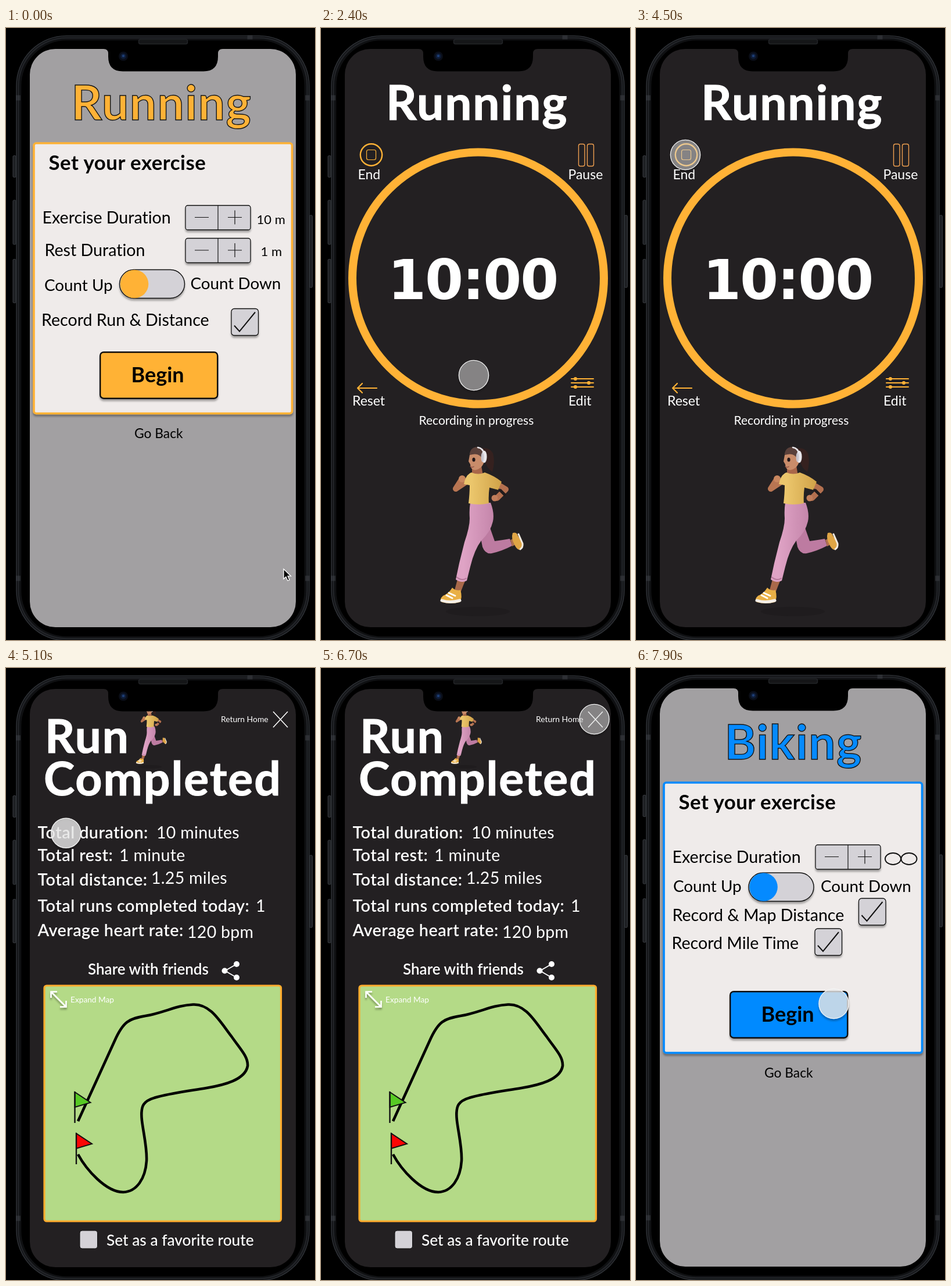
These frames come from a looping animation (532x1052 px, 8000 ms). An HTML page:

```html
<!DOCTYPE html>
<html lang="en">
<head>
<meta charset="utf-8">
<title>Workout prototype</title>
<style>
  html, body { margin: 0; width: 100%; height: 100%; overflow: hidden; background: #000; }
  svg { display: block; width: 532px; height: 1052px; }
  text { font-family: Lato, "Noto Sans", sans-serif; white-space: pre; font-variant-ligatures: none; }
  .clock { font-family: "DejaVu Sans", sans-serif; letter-spacing: -2px; }
</style>
</head>
<body>
<svg id="stage" viewBox="0 0 532 1052"></svg>
<script>
const ORANGE = '#ffb236', BLUE = '#058aff', DARK = '#232022', GREY = '#d4d2d7';

const text = (x, y, size, str, fill = '#000', weight = 400, extra = '') =>
  `<text x="${x}" y="${y}" font-size="${size}" font-weight="${weight}" fill="${fill}" ${extra}>${str}</text>`;
const rect = (x, y, w, h, r, fill, stroke = 'none', sw = 1, extra = '') =>
  `<rect x="${x}" y="${y}" width="${w}" height="${h}" rx="${r}" fill="${fill}" stroke="${stroke}" stroke-width="${sw}" ${extra}/>`;
const circle = (x, y, r, fill, stroke = 'none', sw = 1) =>
  `<circle cx="${x}" cy="${y}" r="${r}" fill="${fill}" stroke="${stroke}" stroke-width="${sw}"/>`;
const ellipse = (x, y, rx, ry, fill) => `<ellipse cx="${x}" cy="${y}" rx="${rx}" ry="${ry}" fill="${fill}"/>`;
const line = (d, stroke, sw, extra = '') =>
  `<path d="${d}" fill="none" stroke="${stroke}" stroke-width="${sw}" ${extra}/>`;
const shape = (d, fill, extra = '') => `<path d="${d}" fill="${fill}" ${extra}/>`;
const spacing = n => `letter-spacing="${n}"`;
const heading = (x, y, size, str) =>
  text(x, y, size, str, '#fff', 700, `stroke="#fff" stroke-width="1.2" ${spacing(1.9)}`);
const round = 'stroke-linecap="round" stroke-linejoin="round"';
const shadow = 'filter="url(#drop)"';

// Controls of the setup screens
const label = (x, y, str, size = 28.6) => text(x, y, size, str);
const stepper = y => rect(309, y, 112, 42, 4, GREY, '#111', 1.3, shadow) +
  line(`M365 ${y}v42M325 ${y + 20.5}h24M382 ${y + 20.5}h24M394 ${y + 8.5}v24`, '#111', 1.2);
const toggle = (x, y, color) => rect(x, y, 112, 49, 24.5, GREY, '#111', 1.4, shadow) +
  circle(x + 25.5, y + 24.5, 24.3, color);
const checkbox = (x, y) => rect(x, y, 46.5, 46, 5, GREY, '#111', 1.3, shadow) +
  line(`M${x + 5} ${y + 29}l9 10L${x + 41} ${y + 6}`, '#111', 2);

const setup = (name, x, color, rows) =>
  rect(41, 36, 458, 994, 44, '#a2a0a2') +
  text(x, 157.5, 82, name, color, 700, `stroke="#151515" stroke-width="1.4" ${spacing(1.5)}`) +
  rect(48, 198, 444.5, 464.5, 4, '#efebea', color, 3.6, shadow) +
  text(73.5, 244, 34.8, 'Set your exercise', '#000', 700, spacing(.5)) +
  label(62.5, 336, 'Exercise Duration') + stepper(305) + rows +
  rect(162.2, 557.2, 202, 79.5, 6, color, '#111', 2.4, shadow) +
  text(215.5, 609, 36, 'Begin', '#000', 700) +
  text(221, 705, 22.8, 'Go Back');

const runner =
  ellipse(270, 1003, 55, 8, '#1f1c1e') +
  // back leg and shoe
  shape('M270 850Q289 846 292 862L299 882Q314 880 325 878L329 890Q312 899 294 903Q283 905 278 892Z', '#bd7ba1') +
  shape('M326 880L333 877 335 888 329 891Z', '#b0714f') +
  shape('M330 868Q337 866 339 873L347 884Q348 896 341 897Q336 895 333 888Q327 877 330 868Z', '#dfa545') +
  line('M340 870L347 886Q348 893 343 896', '#f3ece2', 3, round) +
  // front leg and shoe
  shape('M236 944L250 946 245 958 240 971 229 970Z', '#a9694a') +
  shape('M257 816L292 816Q299 834 296 848Q292 866 276 881Q264 897 257 926L251 950Q242 955 232 948L238 920 247 884Q256 858 256 843Q255 828 257 816Z', 'url(#pants)') +
  line('M234 944Q242 951 250 946', '#b5779a', 2, round) +
  shape('M226 962Q232 968 240 966Q244 979 239 987Q224 991 208 987Q203 982 210 976Q220 972 226 962Z', '#e9b046') +
  line('M208 984Q222 989 239 984', '#f5efe7', 5, round) +
  line('M220 971L231 976M216 975L226 980', '#fff', 3, round) +
  // arms
  line('M303 784L318 793 303 808', '#b3704f', 10, round) +
  line('M309 795L316 802', '#201b1c', 5, round) +
  circle(299, 808, 5.5, '#c07d5b') +
  line('M253 778L232 792 241 778', '#b87552', 10, round) +
  circle(243, 775, 6, '#c9875f') +
  // shirt
  shape('M260 748L276 752 279 770 260 770Z', '#a9674a') +
  shape('M259 764Q271 769 282 764Q299 770 311 780L305 794 290 790Q288 804 289 817Q271 821 254 817Q256 800 256 786L246 784Q249 768 259 764Z', 'url(#shirt)') +
  // head
  shape('M276 723Q290 720 296 731Q300 746 295 763Q285 757 282 742Z', '#35211f') +
  shape('M256 734Q257 723 269 722Q282 724 282 741Q279 758 265 760Q257 759 257 750L254 745Z', '#c98c6a') +
  shape('M256 734Q256 721 269 720Q283 721 285 738Q281 746 277 740Q272 729 256 734Z', '#5a403a') +
  ellipse(263, 742, 2.6, 3.5, '#211719') +
  line('M257 754Q260 756 263 754', '#8c4d42', 1.5, round) +
  line('M270 721Q279 722 281 733', '#e8e6ea', 2.5, round) +
  ellipse(281, 737, 4.6, 10.5, '#e9e7eb') + ellipse(278, 738, 2.4, 8, '#c8c5ce');

const caption = (x, y, str) => text(x, y, 23, str, '#fff');
const sliders = [[603, 438], [610, 461], [617, 438]].map(([y, x]) =>
  line(`M431 ${y}h38`, ORANGE, 2, round) + circle(x, y, 3, ORANGE)).join('');

const timer =
  rect(41, 36, 458, 994, 44, DARK) +
  heading(112, 157.5, 82, 'Running') +
  circle(270.5, 430, 216.5, 'none', ORANGE, 14) +
  text(115, 466, 95, '10:00', '#fff', 700, 'class="clock"') +
  circle(86.5, 218, 18.7, 'none', ORANGE, 2.4) + rect(78.5, 209.5, 16, 17, 3, 'none', ORANGE, 1.2) +
  rect(443.5, 199.5, 10.5, 38, 3, 'none', '#f0a050', 1.4) + rect(458.5, 199.5, 11, 38, 3, 'none', '#f0a050', 1.4) +
  line('M96 619H63M71 611L63 619 71 627', ORANGE, 2.2, round) + sliders +
  caption(63.5, 260, 'End') + caption(425.5, 260, 'Pause') + caption(54, 649, 'Reset') + caption(426, 649, 'Edit') +
  text(168.5, 682, 21, 'Recording in progress', '#fff') + runner;

const stat = (y, name, x, value, dy = 0) =>
  text(54.5, y, 28.8, name, '#fff', 600, spacing(.45)) +
  text(x, y + dy, 28.5, value, '#fff', 400, spacing(.3));
const flag = (x, y, fill) =>
  shape(`M${x} ${y + 1}l27 18l-27 8z`, fill, 'stroke="#111" stroke-width="2"') + line(`M${x} ${y}v54`, '#111', 2.4);

const summary =
  rect(41, 36, 458, 994, 44, DARK) +
  `<g transform="translate(147.8 -201.3) scale(.37)">${runner}</g>` +
  heading(67, 146, 80, 'Run') +
  heading(65, 219, 80.5, 'Completed') +
  text(370, 93, 13.9, 'Return Home', '#fff') + line('M460 75L485 102M485 75L460 102', '#fff', 1.6) +
  stat(293, 'Total duration:', 259, '10 minutes') +
  stat(332, 'Total rest:', 195, '1 minute') +
  stat(374, 'Total distance:', 250, '1.25 miles', -3) +
  stat(419, 'Total runs completed today:', 430, '1') +
  stat(461, 'Average heart rate:', 312, '120 bpm', 3) +
  text(141, 527, 26, 'Share with friends', '#fff', 600) +
  line('M397 509L377 520.5 397 532', '#fff', 1.8) +
  circle(376.5, 520.5, 5, '#fff') + circle(397, 509, 5, '#fff') + circle(397, 532, 5, '#fff') +
  rect(66, 546, 407.5, 405, 4, '#b4da87', '#ffac2e', 3.2) +
  line('M78 557L103 582M77.5 567V556.5H88M103.5 572V582.5H93', '#fff', 2.6, shadow) +
  text(111, 575, 13.7, 'Expand Map', '#fff') +
  line('M124 779L187 641C202 607 212 603 240 598C275 592 292 580 322 578.5C352 577 368 607 388 633' +
    'C404 656 417 668 416 684C412 708 375 717 345 722C315 727 290 730 262 737C236 743 231 752 234 778' +
    'C237 802 243 825 242 847C240 878 225 900 202 901C172 901 138 862 124 836', '#000', 4.6) +
  flag(118.5, 728, '#57c924') + flag(121, 799, '#fb0505') +
  rect(127, 967, 30.5, 31, 4, GREY, '#111', 1) +
  text(173, 993, 26.3, 'Set as a favorite route', '#fff', 500);

const running = setup('Running', 112.5, ORANGE,
  text(431.5, 337, 22, '10 m') + label(66.5, 392, 'Rest Duration') + stepper(361.5) + text(438.5, 392, 22, '1 m') +
  label(66, 452, 'Count Up', 27.8) + toggle(195.5, 415.5, ORANGE) + label(317.5, 448.5, 'Count Down', 27.8) +
  label(61, 512, 'Record Run &amp; Distance') + checkbox(388, 482.5));

const biking = setup('Biking', 152.5, BLUE,
  '<g fill="none" stroke="#111" stroke-width="2"><ellipse cx="442.5" cy="329" rx="13.5" ry="10"/><ellipse cx="470" cy="329" rx="13.5" ry="10"/></g>' +
  label(64, 386, 'Count Up', 27.8) + toggle(194, 353, BLUE) + label(318, 386, 'Count Down', 27.8) +
  label(62.5, 436, 'Record &amp; Map Distance') + checkbox(383.5, 397) +
  label(61.5, 484, 'Record Mile Time') + checkbox(308, 449));

// Device: body behind the screens, notch in front of them
const button = (x, y, h) => rect(x, y, 5, h, 1.5, '#1d1f22', '#3b3e43', 1);
const body =
  button(12, 219.5, 37) + button(12, 296, 76) + button(12, 397.5, 75) + button(522.5, 322, 124) +
  rect(18, 13.5, 504, 1039.5, 86, '#0e0f11', '#2e3136', 1.6) +
  rect(21.5, 17, 497, 1032.5, 82, 'none', '#212327', 2.6) +
  rect(25.5, 20.5, 489, 1026, 79, '#000', '#111214', 1.5) +
  line('M17 120h8M515 120h8M17 946h8M515 946h8M420 12.5v7', '#4a4d53', 9, 'opacity=".4"') +
  rect(228.5, 19.5, 84, 8, 3, '#151618', '#222427', 1.5);
const notch =
  shape('M168 36H373Q365 36 365 44V49Q365 74.5 340 74.5H201Q176 74.5 176 49V44Q176 36 168 36Z', '#000') +
  circle(202, 48.5, 8, '#0a0e18') + circle(202, 48.5, 5, '#0e1c36') + circle(202, 48, 2.3, '#1d3d74');

const gradient = (id, from, to) =>
  `<linearGradient id="${id}"><stop offset=".2" stop-color="${from}"/><stop offset="1" stop-color="${to}"/></linearGradient>`;
const screens = [running, timer, summary, biking];
const stage = document.getElementById('stage');
stage.innerHTML =
  `<defs>${gradient('pants', '#dfa3c5', '#c586ab')}${gradient('shirt', '#ebc66c', '#d0a248')}
    <filter id="drop" x="-20%" y="-20%" width="140%" height="150%">
    <feDropShadow dx="0" dy="3.5" stdDeviation="1.8" flood-opacity=".32"/></filter></defs>
  <g id="phone">${body}${screens.map(s => `<g class="screen">${s}</g>`).join('')}${notch}</g>
  <path id="arrow" d="M0 0V17L4 13.3 7 20 10 18.7 7.1 12.2H12.5Z" fill="#000" stroke="#fff" stroke-width="1.3"/>
  <circle id="touch" r="25.6" stroke="#f4f4f4" stroke-width="1.3" ${shadow}/>`;

const phone = document.getElementById('phone');
const arrow = document.getElementById('arrow');
const touch = document.getElementById('touch');
const layers = [...document.querySelectorAll('.screen')];

const cuts = [2400, 4580, 6760];
const presses = [[2300, 2480], [4380, 4680], [6680, 6770]];
// Pointer stops: time, x, y
const path = [
  [0, 478, 930], [1150, 478, 930], [1400, 470, 893], [1800, 470, 893], [2280, 263, 597], [2600, 263, 597],
  [3400, 126, 633], [3600, 126, 633], [4300, 85, 218], [4950, 85, 218], [5750, 281, 921], [6020, 281, 921],
  [6650, 470.5, 88], [7150, 470.5, 88], [7880, 340.5, 577], [8000, 340.5, 577]
];

function pointer(t) {
  const i = path.findIndex(p => p[0] > t);
  const [t0, x0, y0] = path[i - 1], [t1, x1, y1] = path[i];
  const u = (t - t0) / (t1 - t0), e = u * u * (3 - 2 * u);
  return [x0 + (x1 - x0) * e, y0 + (y1 - y0) * e];
}

function draw() {
  const t = performance.now() % 8000;
  const current = cuts.filter(c => t >= c).length;
  layers.forEach((g, i) => g.style.display = i === current ? '' : 'none');
  phone.setAttribute('transform', `translate(0 ${current === 3 ? -1 : 0})`);

  const place = `translate(${pointer(t)})`;
  const isArrow = t < 1860;
  const pressed = presses.some(([a, b]) => t >= a && t < b);
  arrow.setAttribute('transform', place);
  touch.setAttribute('transform', place);
  arrow.style.display = isArrow ? '' : 'none';
  touch.style.display = isArrow ? 'none' : '';
  touch.setAttribute('fill', `rgba(236,236,236,${pressed ? .45 : .77})`);
  requestAnimationFrame(draw);
}
draw();
</script>
</body>
</html>
```
